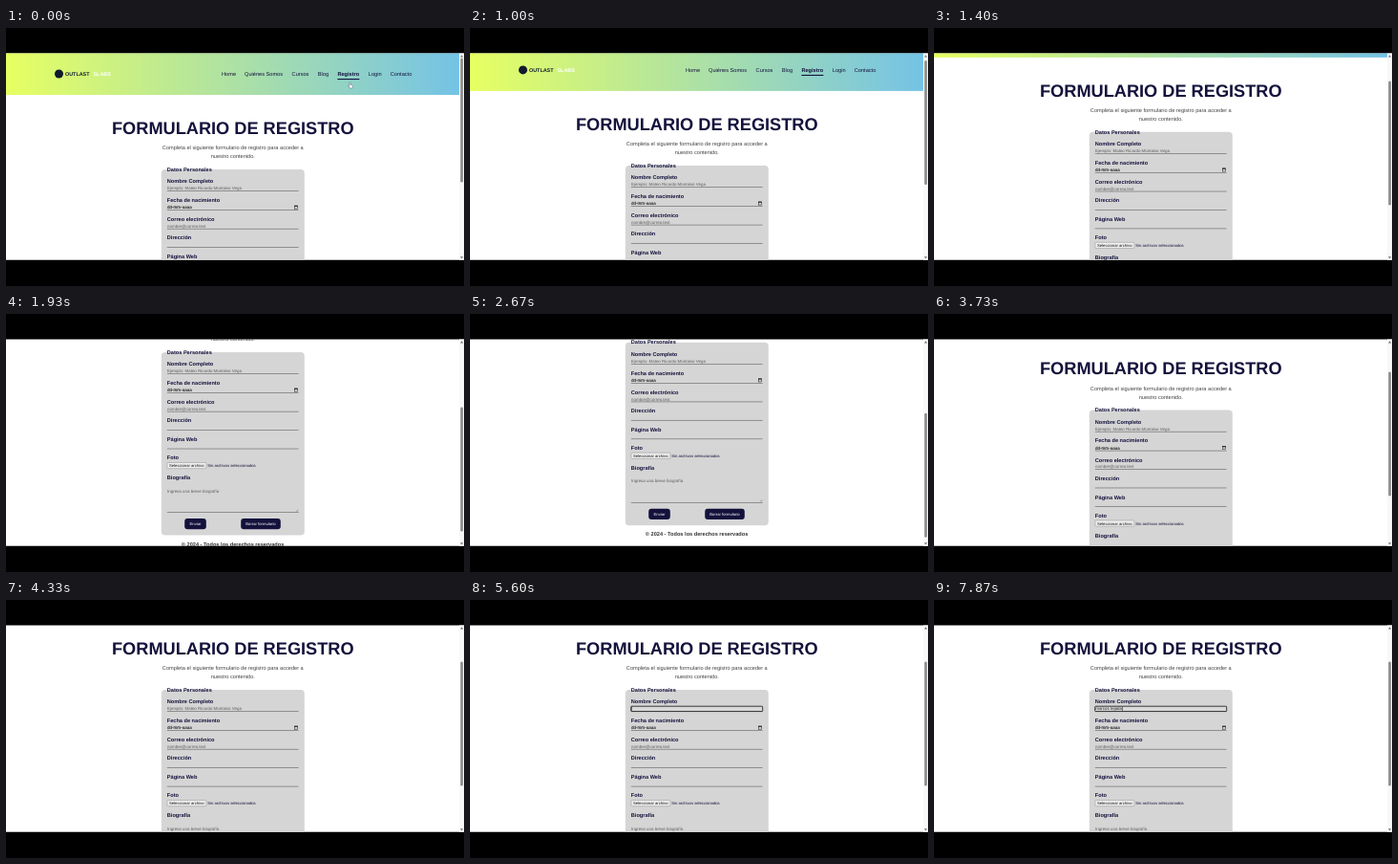
These frames come from a looping animation (480x270 px, 8000 ms). An HTML page:

```html
<!DOCTYPE html>
<html lang="es">
<head>
<meta charset="utf-8">
<title>Formulario de registro</title>
<style>
  html, body { margin: 0; width: 100%; height: 100%; overflow: hidden; background: #000; }
  svg { display: block; width: 480px; height: 270px; }
  text { font-family: "Liberation Sans", Arial, sans-serif; white-space: pre; text-rendering: geometricPrecision; }
</style>
</head>
<body>
<svg id="stage" viewBox="0 0 480 270">
  <defs>
    <linearGradient id="sky">
      <stop offset="0" stop-color="#e7ff62"/>
      <stop offset="1" stop-color="#74c3e6"/>
    </linearGradient>
    <clipPath id="view"><rect y="26.4" width="480" height="216.4"/></clipPath>
  </defs>
  <rect width="480" height="270"/>
  <g clip-path="url(#view)">
    <rect y="26" width="480" height="217" fill="#fff"/>
    <g id="page"></g>
    <rect x="475" y="26" width="5" height="217" fill="#f8f8f8"/>
    <rect id="thumb" x="476.3" width="2.6" height="130" rx="1.3" fill="#898989"/>
    <path d="M476 30.4l1.6-2.2 1.6 2.2zM476 239.2l1.6 2.2 1.6-2.2z" fill="#777"/>
    <path id="hand" d="M0 0q.7-.5 1 .3v2l2 .5q.6.3.5 1l-.5 2.2h-2.4l-1.8-2.4q.2-.7 1.2 0z"
          fill="#fff" stroke="#333" stroke-width=".35"/>
  </g>
</svg>
<script>
const LOOP = 8000;
const NAVY = "#14123c", GREY = "#5e5e5e", INK = "#222";
const BODY = 5.63, INPUT = 4.45, SMALL = 4.2;
const NAME = "marcos tejada";

const byId = id => document.getElementById(id);
const page = byId("page");

function add(tag, attrs, content = "") {
  const el = document.createElementNS("http://www.w3.org/2000/svg", tag);
  for (const key in attrs) el.setAttribute(key, attrs[key]);
  el.textContent = content;
  return page.appendChild(el);
}

// y is the middle of the capital letters
function label(content, x, y, size, fill, more = {}) {
  return add("text", { x, y: y + size * 0.36, "font-size": size, fill, ...more }, content);
}

const box = (x, y, width, height, fill, more = {}) =>
  add("rect", { x, y, width, height, fill, ...more });

const bold = { "font-weight": 700 };
const middle = { "text-anchor": "middle" };

// Header
box(0, 26, 475, 44, "url(#sky)");
add("circle", { cx: 55.5, cy: 48, r: 4.5, fill: "#101a2c" });
label("OUTLAST", 62, 48, 5.4, "#101a2c", bold);
label("SLABS", 91.5, 48, 5.4, "#fff", bold);
[["Home", 226], ["Quiénes Somos", 250], ["Cursos", 299.6], ["Blog", 326.8],
 ["Registro", 347.4], ["Login", 379.8], ["Contacto", 402.8]].forEach(([name, x]) =>
  label(name, x, 48, BODY, NAVY, name === "Registro" ? bold : {}));
box(347.4, 53, 23, 1.1, NAVY);

// Heading
label("FORMULARIO DE REGISTRO", 237.8, 104.2, 18.2, NAVY, { ...bold, ...middle });
label("Completa el siguiente formulario de registro para acceder a", 237.8, 125.2, BODY, "#444", middle);
label("nuestro contenido.", 237.8, 134, BODY, "#444", middle);

// Form
box(162.8, 148, 150, 191.5, "#d5d5d5", { rx: 4 });
[["Datos Personales", 147.7], ["Nombre Completo", 160.2], ["Fecha de nacimiento", 179.8],
 ["Correo electrónico", 200], ["Dirección", 219.4], ["Página Web", 239],
 ["Foto", 258.3], ["Biografía", 279.2]].forEach(([name, y]) =>
  label(name, 168.8, y, 5.6, NAVY, bold));
[170.4, 190.3, 209.9, 229.2, 248.8, 315.3].forEach(y => box(168.8, y, 137.8, 0.55, "#555"));

const hint = label("Ejemplo: Mateo Ricardo Montalvo Vega", 169, 167.7, INPUT, GREY);
label("dd-mm-aaaa", 169, 187.6, INPUT + 0.1, INK, { stroke: INK, "stroke-width": 0.12 });
box(302.4, 186.2, 3.2, 3, "none", { stroke: INK, "stroke-width": 0.55 });
box(302.2, 185.7, 3.6, 1.1, INK);
label("nombre@correo.test", 169, 207.2, INPUT, GREY);

box(169, 263.5, 40.8, 6.2, "#efefef", { rx: 0.8, stroke: "#767676", "stroke-width": 0.4 });
label("Seleccionar archivo", 171, 266.6, SMALL, "#111");
label("Sin archivos seleccionados", 211.2, 266.6, SMALL, NAVY);
label("Ingresa una breve biografía", 169, 293, INPUT, GREY);
add("path", { d: "M304 314.8l2.2-2.2m-1 2.2l1-1", stroke: "#555", "stroke-width": 0.4 });

[["Enviar", 187.2, 22.6], ["Borrar formulario", 246.2, 41.6]].forEach(([name, x, w]) => {
  box(x, 322, w, 11.2, NAVY, { rx: 3 });
  label(name, x + w / 2, 327.6, SMALL, "#fff", middle);
});
label("© 2024 - Todos los derechos reservados", 237.6, 348.7, BODY, "#333", { ...bold, ...middle });

// Focused name field
const ring = box(168.7, 165.2, 138, 5.4, "#d9d9d9", { rx: 0.8, stroke: "#111", "stroke-width": 0.8 });
page.insertBefore(ring, hint);
const typed = label("", 169.2, 167.7, INPUT, INK);
const caret = box(169.4, 165.7, 0.5, 4.3, "#111");

// Motion: [time, value]
const SCROLL = [[870, 0], [1000, 4], [1400, 39], [1730, 88], [1930, 108], [2130, 117], [2400, 123],
  [2560, 123], [2700, 117], [3200, 79.5], [3400, 61], [3730, 47.5], [3870, 46.5], [4270, 54]];
const HAND_X = [[70, 360], [600, 338]];
const HAND_Y = [[70, 57], [600, 160]];
const KEYS = [5670, 5800, 5930, 6070, 6200, 6330, 6530, 6730, 6930, 7070, 7200, 7470, 7600];
const FOCUS = 4400, CLEAR = 5600;

function sample(track, t) {
  const i = track.findIndex(([time]) => time > t);
  if (i === 0) return track[0][1];
  if (i < 0) return track[track.length - 1][1];
  const [t0, a] = track[i - 1], [t1, b] = track[i];
  return a + (b - a) * (t - t0) / (t1 - t0);
}

const show = (el, on) => el.setAttribute("visibility", on ? "visible" : "hidden");

function draw(t) {
  const y = sample(SCROLL, t);
  page.setAttribute("transform", `translate(0 ${-y})`);
  byId("thumb").setAttribute("y", 31.6 + y * 0.61);

  const hand = byId("hand");
  hand.setAttribute("transform", `translate(${sample(HAND_X, t)} ${sample(HAND_Y, t)})`);
  show(hand, t < 870);

  show(ring, t >= FOCUS);
  show(caret, t >= FOCUS);
  show(hint, t < CLEAR);
  const value = NAME.slice(0, KEYS.filter(k => k <= t).length);
  if (typed.textContent !== value) typed.textContent = value;
  caret.setAttribute("x", 169.4 + (value ? typed.getComputedTextLength() : 0));
}

const start = performance.now();
function tick() {
  draw((performance.now() - start) % LOOP);
  requestAnimationFrame(tick);
}
tick();
</script>
</body>
</html>
```
